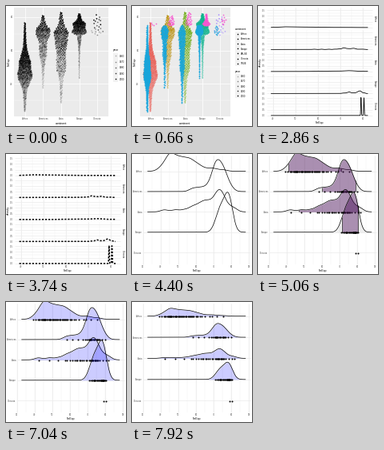
Recreate the animation shown at these times as a matplotlib script. Size 150x150 px, loop 8000 ms.

```python
import numpy as np
import matplotlib.pyplot as plt
from matplotlib.animation import FuncAnimation
from matplotlib.patches import Rectangle

plt.rcParams["font.family"] = "Liberation Sans"
SIZE, DPI = 150, 100
PT = 72 / DPI
TICK, TITLE = 2.8, 3.5
GREY, KEY, MUTED = "#ebebeb", "#f2f2f2", "#4d4d4d"
STEP_MS, INTERVAL, LOOP_MS = 220, 20, 8000

NAMES = ["Africa", "Americas", "Asia", "Europe", "Oceania"]
COUNTRIES = dict(zip(NAMES, (52, 25, 33, 30, 2)))
# Five-number summaries of life expectancy: one year, and all twelve years
LATEST = {
    "Africa": (39.2, 45.8, 51.2, 57.4, 75.7),
    "Americas": (58.1, 70.7, 72.0, 75.3, 79.8),
    "Asia": (42.1, 63.6, 71.0, 74.2, 82.0),
    "Europe": (70.8, 74.1, 77.5, 78.7, 80.6),
    "Oceania": (79.1, 79.4, 79.75, 80.1, 80.4),
}
OVERALL = {
    "Africa": (23.6, 42.4, 47.8, 54.4, 76.4),
    "Americas": (37.6, 58.4, 67.0, 71.7, 80.7),
    "Asia": (28.8, 51.4, 61.8, 69.5, 82.6),
    "Europe": (43.6, 69.6, 72.2, 75.5, 81.8),
    "Oceania": (69.1, 71.2, 73.7, 77.6, 81.2),
}
HUES = {"Africa": "#e8625a", "Americas": "#b98f0a", "Asia": "#6aa80e",
        "Europe": "#0ab38c", "FALSE": "#18a6dc", "Oceania": "#a58aff",
        "TRUE": "#f757d0"}


def quantile(p, summary):
    """Straight between the quartiles, thinning tails outside them."""
    lo, q1, mid, q3, hi = summary

    def tail(u):
        u = np.clip(u, 0, 1)
        return u * (0.4 + 0.6 * u ** 3)

    body = np.interp(p, [0.25, 0.5, 0.75], [q1, mid, q3])
    return body - (q1 - lo) * tail(1 - 4 * p) + (hi - q3) * tail(4 * p - 3)


def sample(name):
    n = COUNTRIES[name]
    p = np.linspace(0, 1, n)
    p[1:-1] += np.random.default_rng(n).uniform(-0.5, 0.5, n - 2) / n
    return quantile(p, LATEST[name])


def history(name):
    n = 12 * COUNTRIES[name]
    p = np.linspace(0, 1, n)
    t = np.clip(p + np.random.default_rng(n).normal(0, 0.22, n), 0, 1)
    return quantile(p, OVERALL[name]), np.round(11 * t) / 11


LIFE = {name: sample(name) for name in NAMES}
ALL = np.concatenate(list(LIFE.values()))


def scale(lo, hi, a, b):
    return lambda v: a + (np.asarray(v) - lo) * (b - a) / (hi - lo)


def kde(x, data, bw):
    z = (np.asarray(x)[:, None] - data) / bw
    return np.exp(-z * z / 2).mean(axis=1) / (bw * np.sqrt(2 * np.pi))


def bandwidth(data):
    iqr = np.subtract(*np.percentile(data, [75, 25]))
    return 0.9 * min(data.std(ddof=1), iqr / 1.34) * len(data) ** -0.2


def van_der_corput(n):
    i = np.arange(1, n + 1)
    return sum(((i >> b) & 1) / 2 ** (b + 1) for b in range(12))


fig = plt.figure(figsize=(SIZE / DPI, SIZE / DPI), dpi=DPI, facecolor="white")


def canvas():
    ax = fig.add_axes([0, 0, 1, 1])
    ax.set(xlim=(0, SIZE), ylim=(SIZE, 0))
    ax.axis("off")
    return ax


def text(ax, x, y, s, px=TICK, color=MUTED, ha="center", rot=0):
    ax.text(x, y, s, fontsize=px * PT, color=color, ha=ha,
            va="center" if rot else "center_baseline", rotation=rot)


def box(ax, x0, y0, x1, y1, color=GREY):
    ax.add_patch(Rectangle((x0, y0), x1 - x0, y1 - y0, fc=color, lw=0, zorder=0))


def dots(ax, x, y, d, color="black", alpha=1, z=3):
    ax.scatter(x, y, s=(d * PT) ** 2, c=color, alpha=alpha, lw=0, zorder=z)


def x_grid(ax, sx, x0, x1, spans, color):
    for step, w in ((10, 0.7), (5, 0.35)):
        xs = sx(np.arange(30, 96, step))
        xs = xs[(xs > x0) & (xs < x1)]
        for top, bottom in spans:
            ax.vlines(xs, top, bottom, color=color, lw=w * PT, zorder=1)


def y_grid(ax, ys, x0, x1, color, w=0.7):
    ax.hlines(ys, x0, x1, color=color, lw=w * PT, zorder=1)


def x_axis(ax, sx, x0, x1):
    for v in range(30, 100, 10):
        if x0 < sx(v) < x1:
            text(ax, sx(v), 140.9, str(v))
    text(ax, (x0 + x1) / 2, 146, "lifeExp", TITLE, "black")


def legend(ax, x, y, title, items, pitch):
    text(ax, x, y, title, TITLE, "black", "left")
    for k, (label, alpha) in enumerate(items, 1):
        cy = y + 0.7 + k * pitch
        box(ax, x, cy - pitch / 2, x + 6, cy + pitch / 2, KEY)
        dots(ax, [x + 3], [cy], 1.6, alpha=alpha)
        text(ax, x + 7.5, cy, label, TICK, "black", "left")


def swarm(mode):
    ax = canvas()
    black = mode == "black"
    left, right = 10, 128 if black else 123
    sx = scale(0.4, 5.6, left, right)
    sy = scale(20.65, 85.55, 138, 2)
    unit = (right - left) / 5.2
    box(ax, left, 2, right, 138)
    y_grid(ax, sy([40, 60, 80]), left, right, "white")
    y_grid(ax, sy([30, 50, 70]), left, right, "white", 0.35)
    ax.vlines(sx(range(1, 6)), 2, 138, color="white", lw=0.7 * PT, zorder=1)

    def layer(center, life, alpha, width, color, z):
        dens = kde(life, life, bandwidth(life) / 2)
        side = (2 * van_der_corput(len(life)) - 1) * dens / dens.max()
        dots(ax, sx(center) + side * width * unit, sy(life), 1.7, color, alpha, z)

    for k, name in enumerate(NAMES, 1):
        life, t = history(name)
        if black:
            layer(k, life, 0.2 + 0.8 * t, 0.4, "black", 3)
        else:
            layer(k, life, 0.5 + 0.5 * t, 0.4, HUES[name], 3)
        if mode == "split":
            high = life > 75
            layer(k - 0.2, life[~high], 0.9, 0.2, HUES["FALSE"], 4)
            layer(k + 0.2, life[high], 0.9, 0.2, HUES["TRUE"], 4)
        text(ax, sx(k), 140.9, name)
    for v in (40, 60, 80):
        text(ax, 8.6, sy(v), str(v), ha="right")
    text(ax, (left + right) / 2, 146, "continent", TITLE, "black")
    text(ax, 3.4, 70, "lifeExp", TITLE, "black", rot=90)

    years = [(str(1960 + 10 * k), 0.3 + 0.17 * k) for k in range(5)]
    if black:
        legend(ax, 134, 54.5, "year", years, 7.2)
    else:
        keys = [(n, 1) for n in HUES if mode == "split" or n in NAMES]
        legend(ax, 128.5, 28, "continent", keys, 6.15)
        legend(ax, 128.5, 81, "year", years, 6.1)
    return ax


def blank(curve=False):
    ax = canvas()
    sx = scale(37.05, 84.14, 2, 148)
    box(ax, 2, 2, 148, 138)
    x_grid(ax, sx, 2, 148, [(2, 138)], "white")
    x_axis(ax, sx, 2, 148)
    if curve:
        x = np.linspace(39.2, 82, 200)
        d = kde(x, ALL, bandwidth(ALL))
        ax.plot(sx(x), 132 - 123 * d / d.max(), color="black", lw=0.8 * PT)
    return ax


def facets(dotted):
    ax = canvas()
    left, right = 10.5, 143
    sx = scale(37.05, 84.14, left, right)
    x = np.linspace(39.2, 82, 500)
    tops = 2 + 27.5 * np.arange(5)
    x_grid(ax, sx, left, right, [(y, y + 26) for y in tops], GREY)
    for top, name in zip(tops, NAMES):
        sy = scale(-0.08, 1.73, top + 26, top)
        y_grid(ax, sy([0, 0.5, 1, 1.5]), left, right, GREY)
        y_grid(ax, sy([0.25, 0.75, 1.25]), left, right, GREY, 0.35)
        d = kde(x, LIFE[name], bandwidth(LIFE[name]) / 3)
        ax.plot(sx(x), sy(d), color="black", lw=(1.5 if dotted else 0.8) * PT,
                ls=(0, (1.5, 1.2)) if dotted else "-")
        for v in (0, 0.5, 1, 1.5):
            text(ax, 9.2, sy(v), f"{v:.1f}", ha="right")
        text(ax, 146, top + 13, name, color="#1a1a1a", rot=-90)
    x_axis(ax, sx, left, right)
    text(ax, 3.2, 70, "density", TITLE, "black", rot=90)
    return ax


def ridges(fill=None, gain=440, first=21.5, points=True):
    ax = canvas()
    left, right = 13.5, 147.5
    lo, hi = (29.8, 90.7) if gain else (37.05, 84.14)
    sx = scale(lo, hi, left, right)
    x = np.linspace(32.6, 88.1, 400)
    pitch = (123.2 - first) / 4
    x_grid(ax, sx, left, right, [(2, 138)], GREY)
    for k, name in enumerate(NAMES):
        base, data, z = first + k * pitch, LIFE[name], 3 + k
        y_grid(ax, base, left, right, GREY)
        text(ax, 12.4, base, name, ha="right")
        if gain and len(data) > 2:
            y = base - gain * kde(x, data, 2.1)
            if fill == "quantile":
                cuts = np.percentile(data, [2.5, 97.5])
                mid = (x >= cuts[0]) & (x <= cuts[1])
                ax.fill_between(sx(x), base, y, color="grey", alpha=0.12, lw=0, zorder=z)
                ax.fill_between(sx(x), base, y, where=mid, color="#440154",
                                alpha=0.4, lw=0, zorder=z)
                ax.vlines(sx(cuts), np.interp(cuts, x, y), base, color="black",
                          lw=0.6 * PT, zorder=z)
            elif fill:
                ax.fill_between(sx(x), base, y, color=fill, alpha=0.2, lw=0, zorder=z)
            ax.plot(sx(x), y, color="black", lw=0.7 * PT, zorder=z)
        if points:
            dots(ax, sx(data), np.full(len(data), base + 0.3), 2, z=z)
    x_axis(ax, sx, left, right)
    return ax


# Each scene with the step at which it starts
SCENES = [
    (0, swarm("black")),
    (2, swarm("split")),
    (6, swarm("hue")),
    (9, blank()),
    (10, blank(curve=True)),
    (12, facets(dotted=False)),
    (15, facets(dotted=True)),
    (19, ridges(points=False)),
    (21, ridges("quantile")),
    (26, ridges(gain=0, first=17.7)),
    (29, ridges()),
    (31, ridges("blue")),
    (36, ridges("blue", gain=190, first=17.7)),
]


def draw(i):
    step = i * INTERVAL // STEP_MS
    current = max(k for k, (start, _) in enumerate(SCENES) if start <= step)
    for k, (_, ax) in enumerate(SCENES):
        ax.set_visible(k == current)
    return []


anim = FuncAnimation(fig, draw, frames=LOOP_MS // INTERVAL, interval=INTERVAL,
                     repeat=True, repeat_delay=0, init_func=lambda: draw(0))
plt.show()
```
